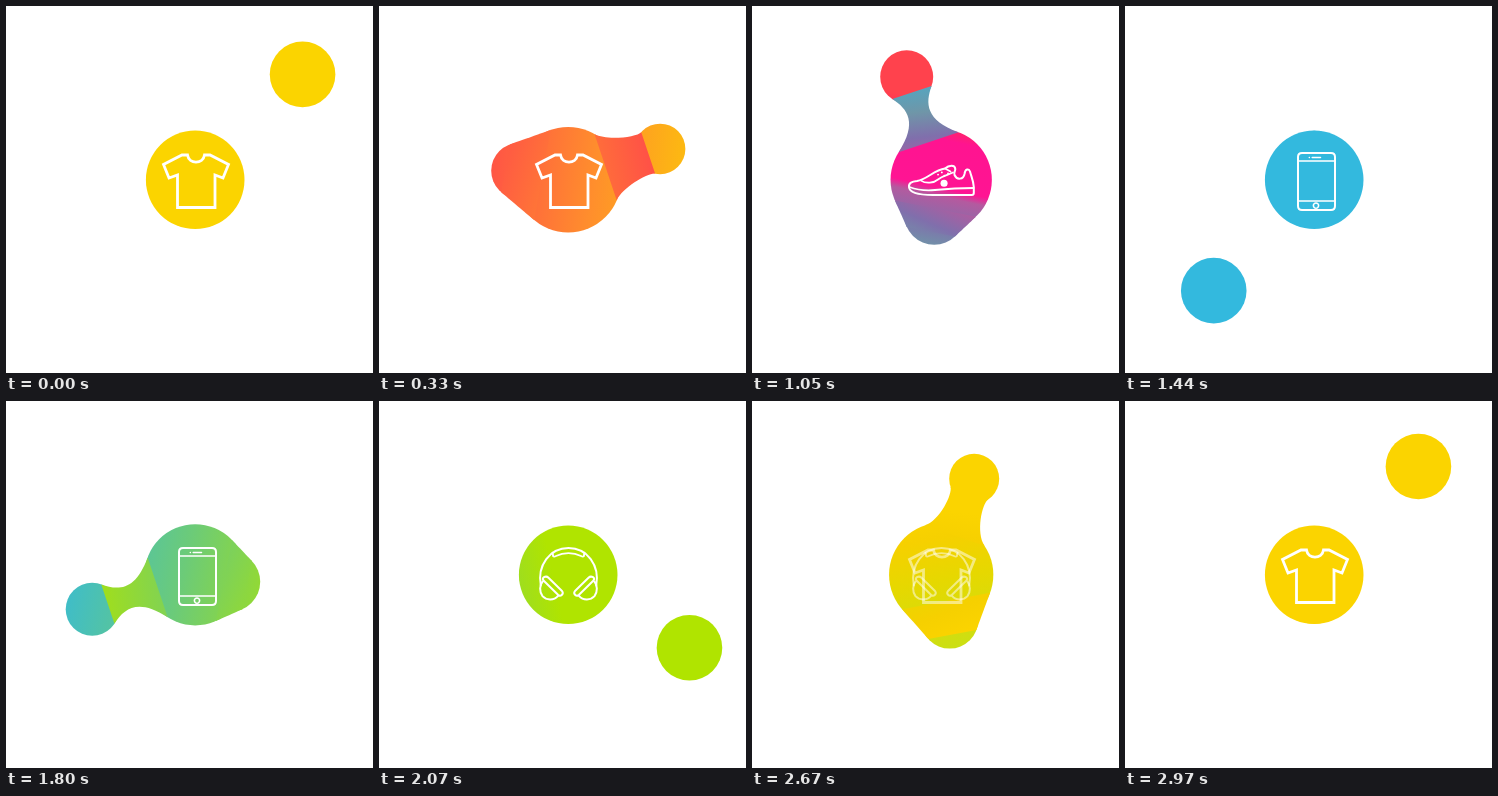
An HTML page with a canvas for the animation above (3000 ms loop, 367 by 367 pixels).

```html
<!DOCTYPE html>
<html lang="en">
<head>
<meta charset="utf-8">
<title>Orbiting blob</title>
<style>
  html, body { margin: 0; width: 100%; height: 100%; overflow: hidden; background: #fff; }
  canvas { display: block; width: 367px; height: 367px; }
</style>
</head>
<body>
<canvas id="stage" width="367" height="367"></canvas>
<script>
const ctx = document.getElementById('stage').getContext('2d');
const LOOP = 3000, LAP = LOOP / 4, STEP = 30, CROSSING = 365;
const CX = 189.2, CY = 173.8;

const YELLOW = '#fbd400', RED = '#ff424d', BLUE = '#33b9de', GREEN = '#b0e400';

// Colour stops from the old colour to the new one, per lap
const BLENDS = [
  [[0, YELLOW], [0.5, '#ff8f2c'], [1, RED]],
  [[0, RED], [0.27, RED], [0.34, '#ff2a58'], [0.4, '#ff1490'], [0.57, '#ff1493'],
   [0.6, '#b45a9f'], [0.7, '#806fac'], [0.79, '#6f96a8'], [1, BLUE]],
  [[0, BLUE], [0.5, '#6ccb78'], [1, GREEN]],
  [[0, GREEN], [0.5, '#cbdf14'], [0.75, '#e6d800'], [0.9, '#f6d000'], [1, YELLOW]]
];

// ms from crossing, along, across, radius, spread, pinch
const LUMP = [
  [-125, 15, 0, 34, 1, 0],
  [-71, 35, 7, 30, 1, 0],
  [-41, 49, 9, 28, 1, 0],
  [0, 71, 20, 26.5, 0.9, 0.1],
  [49, 96, 33, 25, 0.5, 0.5],
  [71, 103, 34.5, 26.5, 0.5, 1],
  [120, 119, 39, 30, 0.5, 1.5]
];

const clamp = (v, lo, hi) => Math.min(hi, Math.max(lo, v));
const ramp = (v, from, to) => clamp((v - from) / (to - from), 0, 1);

function sample(table, x) {
  let i = 1;
  while (i < table.length - 1 && table[i][0] < x) i++;
  const a = table[i - 1], b = table[i], f = ramp(x, a[0], b[0]);
  return a.map((v, j) => v + (b[j] - v) * f);
}

// Free flight: one leaf of a four-leaf path, slow at its tip
function orbit(x) {
  const p = x / LAP;
  const u = p + 0.1035 * Math.sin(2 * Math.PI * p);
  const size = 276 + 8 * Math.max(0, 1 - 8 * Math.abs(u - 0.5));
  return [3 * u * (1 - u) ** 2 * size, 3 * u * u * (1 - u) * size];
}

function lumpAt(x, flight) {
  if (x > 120) {
    const [along, across] = orbit(flight);
    return { along, across, r: 30 + 2.8 * ramp(x, 120, 165), spread: 0, pinch: 0 };
  }
  const [, along, across, r, spread, pinch] = sample(LUMP, x);
  return { along, across, r, spread, pinch };
}

function disc(x, y, r) {
  ctx.beginPath();
  ctx.arc(x, y, r, 0, 2 * Math.PI);
  ctx.fill();
}

// Skin joining the body to a lump
function drawNeck(R, x, y, lump) {
  const { r, spread, pinch } = lump;
  const d = Math.hypot(x, y), dir = Math.atan2(y, x);
  if (d <= R - r) return;
  const tangent = Math.acos((R - r) / d);
  const a = tangent * spread;
  const b = Math.PI - (Math.PI - tangent) * spread;
  const p = [R * Math.cos(a), R * Math.sin(a)];
  const q = [d + r * Math.cos(b), r * Math.sin(b)];
  const h = Math.min(1.2, Math.hypot(q[0] - p[0], q[1] - p[1]) / (R + r)) * pinch;
  const hp = [p[0] + Math.sin(a) * R * h, p[1] - Math.cos(a) * R * h];
  const hq = [q[0] - Math.sin(b) * r * h, q[1] + Math.cos(b) * r * h];
  ctx.save();
  ctx.rotate(dir);
  ctx.beginPath();
  ctx.moveTo(...p);
  ctx.bezierCurveTo(...hp, ...hq, ...q);
  ctx.lineTo(q[0], -q[1]);
  ctx.bezierCurveTo(hq[0], -hq[1], hp[0], -hp[1], p[0], -p[1]);
  ctx.fill();
  ctx.restore();
}

function blendFill(lap, x) {
  const mid = -46 - 0.53 * x + 0.4 * Math.max(0, -200 - x);
  const tilt = -0.21 * clamp(x / 60, -1, 1);
  const c = Math.cos(tilt), s = Math.sin(tilt), lo = mid - 140, hi = mid + 140;
  const fill = ctx.createLinearGradient(lo * c, lo * s, hi * c, hi * s);
  BLENDS[lap].forEach(stop => fill.addColorStop(...stop));
  return fill;
}

function drawBlob(lap, x) {
  const shift = x - 6;
  const R = 49.3 + 5.5 * Math.exp(-((shift / 60) ** 2));
  ctx.save();
  ctx.translate(CX, CY);
  ctx.rotate(Math.PI - lap * Math.PI / 2);
  ctx.fillStyle = blendFill(lap, x);
  disc(0, 0, R);
  for (const side of [1, -1]) {
    const lump = lumpAt(side * shift, side * x);
    const px = side * lump.along;
    disc(px, lump.across, lump.r);
    if (lump.spread) drawNeck(R, px, lump.across, lump);
  }
  ctx.restore();
}

const line = (d, width) => ({ path: new Path2D(d), width });

const cup = 'M164.5 179.5Q163 177.5 165 176.2Q167.5 174.8 169.5 176.8L183 190' +
  'Q184.6 192 183 193.8Q181 195.6 179 193.8Z' +
  'M163.6 180.5C160.5 184 160.2 191 163.5 195.2C167.5 199.6 175 199.6 179 194.8';
const cups = new Path2D(cup);
cups.addPath(new Path2D(cup), new DOMMatrix([-1, 0, 0, 1, 379, 0]));

const ICONS = [
  [line('M176 149H181.5C183 158.5 197 158.5 198.5 149H204L222.5 158.5L217 172L209 169' +
    'V201.5H171.5V169L163 172L157.5 158.5Z', 2.8)],
  [line('M157 181C156.5 177 160 175.5 165 175C175 173.5 182 164 193 162.5' +
    'C197 158.8 203 158.5 203.3 163C203.3 165.5 201.5 166.5 202.5 169' +
    'C205 174.5 211.5 173.5 212.5 168C213.2 162.5 217 162.5 218 165.5' +
    'C219.5 171 221.5 175 221.8 181V187Q221.8 189 219.8 189H181' +
    'C170 189 157.5 188 157 181Z', 2),
   line('M157.5 181C164 183.5 174 184.8 183 184C197 182.6 210 182 221.5 182', 1.8),
   line('M169 174.6C174 178 182 177 186 173.5C190 170 196 169 201 166.5M193 162.5L198.5 165.5', 1.7),
   line('M186 168.6h.1M189.8 166.4h.1M192.4 169.6h.1M196 167.4h.1', 1.8),
   line('M192 177.2h.1', 7)],
  [line('M177 147H206Q210 147 210 151V200Q210 204 206 204H177Q173 204 173 200V151Q173 147 177 147Z', 2),
   line('M173 155H210M173 195H210', 1.5),
   line('M184.3 151.4h.1M187.2 151.4H195.5', 1.5),
   line('M188.4 199.6a2.6 2.6 0 1 0 5.2 0a2.6 2.6 0 1 0 -5.2 0', 1.6)],
  [line('M161.8 184.5C158 164 171 147 189.5 147C208 147 221 164 217.2 184.5', 2),
   line('M173.5 151.8L174.2 155.2Q175 156.2 177 155C184.5 151.2 194.5 151.2 202 155' +
    'Q204 156.2 204.8 155.2L205.5 151.8', 1.9),
   { path: cups, width: 2 }]
];

function drawIcon(index, alpha) {
  if (alpha <= 0) return;
  ctx.globalAlpha = alpha;
  ctx.strokeStyle = '#fff';
  ctx.lineCap = 'round';
  ctx.lineJoin = index ? 'round' : 'miter';
  for (const { path, width } of ICONS[index]) {
    ctx.lineWidth = width;
    ctx.stroke(path);
  }
  ctx.globalAlpha = 1;
}

function draw(t) {
  const local = (t - CROSSING + LAP / 2 + LOOP) % LOOP;
  const lap = Math.floor(local / LAP);
  const x = local - lap * LAP - LAP / 2;
  ctx.fillStyle = '#fff';
  ctx.fillRect(0, 0, 367, 367);
  drawBlob(lap, x);
  const fade = ramp(x, 0, 110);
  drawIcon(lap, 1 - fade);
  drawIcon((lap + 1) % 4, fade);
}

function tick() {
  const t = performance.now();
  draw(Math.floor((t + 2) / STEP) * STEP % LOOP);
  requestAnimationFrame(tick);
}
tick();
</script>
</body>
</html>
```
